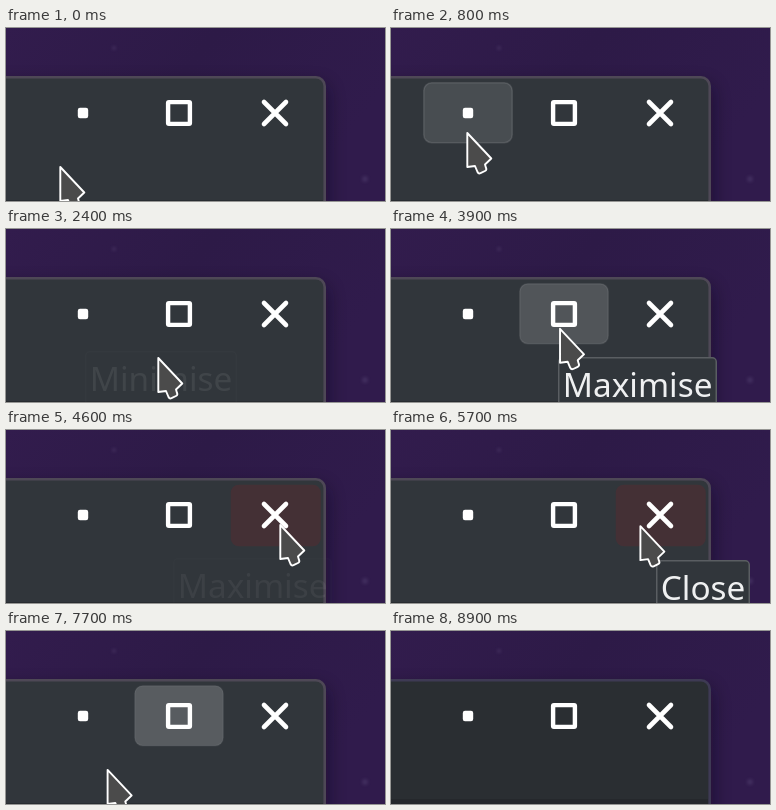
An HTML page for the animation above (9 s loop, 379x173 px).

```html
<!DOCTYPE html>
<html lang="en">
<head>
<meta charset="utf-8">
<title>Window buttons</title>
<style>
html, body { margin: 0; width: 100%; height: 100%; overflow: hidden; background: #2c1a46; }
svg { display: block; width: 100vw; height: 100vh; }
text { font: 33.33px "Noto Sans", sans-serif; fill: #eff0f1; }
</style>
</head>
<body>
<svg viewBox="0 0 379 173" xmlns="http://www.w3.org/2000/svg">
  <defs>
    <linearGradient id="sky" x1="0" y1="0" x2="1" y2="0.35">
      <stop offset="0" stop-color="#321c4d"/>
      <stop offset="0.5" stop-color="#2d1a47"/>
      <stop offset="1" stop-color="#301b4c"/>
    </linearGradient>
    <filter id="soft" x="-20%" y="-50%" width="140%" height="200%"><feGaussianBlur stdDeviation="9"/></filter>
    <filter id="blur" x="-100%" y="-100%" width="300%" height="300%"><feGaussianBlur stdDeviation="1.5"/></filter>
  </defs>
  <rect width="379" height="173" fill="url(#sky)"/>
  <g fill="#5a4a78" opacity="0.4" filter="url(#blur)">
    <circle cx="108" cy="20" r="2"/>
    <circle cx="359" cy="151" r="3"/>
  </g>
  <rect x="-60" y="56" width="382" height="190" rx="10" fill="#0c0618" opacity="0.45" filter="url(#soft)"/>
  <rect id="frame" x="-20" y="48" width="340" height="200" rx="10"/>
  <rect id="body" x="-20" y="50.6" width="337.4" height="200" rx="7.5"/>
  <rect id="edge" x="0" width="317" height="10" fill="#282c30"/>
  <g id="buttons"></g>
  <rect x="71.8" y="79.8" width="10.4" height="10.4" rx="2.2" fill="#fff"/>
  <rect x="162.1" y="74.1" width="21.8" height="21.8" rx="0.8" fill="none" stroke="#fff" stroke-width="4.4"/>
  <path d="M258 74L280 96M280 74L258 96" stroke="#fff" stroke-width="4.6" stroke-linecap="round"/>
  <g id="tips"></g>
  <path id="cursor" d="M0.3 0V34L8 33L10.5 39Q11.5 41 13.5 40.2L18 38Q20 37 19 35L18 31.5L24.3 25.5Z" fill="#4b4b4b" stroke="#fff" stroke-width="1.9" stroke-linejoin="round"/>
</svg>
<script>
const LOOP = 9000, STEP = 100;
const $ = id => document.getElementById(id);
const set = (el, attrs) => { for (const k in attrs) el.setAttribute(k, attrs[k]); };

function add(parent, tag, attrs) {
  const el = document.createElementNS("http://www.w3.org/2000/svg", tag);
  set(el, attrs);
  parent.appendChild(el);
  return el;
}

const ramp = (t, from, to) => Math.min(1, Math.max(0, (t - from) / (to - from)));
const smooth = u => u * u * (3 - 2 * u);

// Fades in from a to b and out from c to d
const pulse = (t, [a, b, c, d]) => ramp(t, a, b) - ramp(t, c, d);

const begin = [54, 139];
// Each move: leave, arrive, x, y
const moves = [
  [100, 800, 76, 105], [1700, 2400, 152, 129], [2700, 2800, 164, 100],
  [3800, 4600, 274, 95], [4900, 5000, 282, 93], [5400, 6200, 178, 103],
  [7000, 7400, 111, 136], [7600, 8200, -20, 176]
];

function cursorAt(t) {
  return moves.reduce(([x, y], [leave, arrive, toX, toY]) => {
    const u = smooth(ramp(t, leave, arrive));
    return [x + (toX - x) * u, y + (toY - y) * u];
  }, begin);
}

const white = { color: "#fff", fill: 0.19, line: 0.2, peak: 1, grow: 0 };
const red = { color: "#9c1a1c", fill: 0.36, line: 0, peak: 1, grow: 1.5 };
const buttons = [
  { ...white, peak: 0.6, fades: [[400, 800, 1700, 2300]] },
  { ...white, fades: [[2700, 2800, 3800, 4300], [6100, 6400, 7700, 8200]] },
  { ...red, fades: [[4500, 4700, 5400, 6000]] }
];

const tips = [
  { text: "Minimise", x: 79, y: 122, w: 152, fade: [1100, 1400, 1800, 2450] },
  { text: "Maximise", x: 167, y: 128, w: 159, fade: [2700, 2800, 4100, 4630] },
  { text: "Close", x: 265, y: 130, w: 94, fade: [4600, 4700, 5700, 6370] },
  { text: "Maximise", x: 185, y: 125, w: 159, fade: [6800, 7100, 7100, 7400] }
];

buttons.forEach((b, i) => {
  b.el = add($("buttons"), "rect", {
    x: 32.75 + 96 * i, y: 54.75, width: 88.5 + b.grow, height: 60 + b.grow, rx: 8,
    fill: b.color, stroke: b.color, "stroke-width": 1.6
  });
});

for (const p of tips) {
  p.el = add($("tips"), "g", {});
  add(p.el, "rect", {
    x: p.x + 0.75, y: p.y + 0.75, width: p.w - 1.5, height: 54, rx: 4,
    fill: "#31363b", stroke: "#5a5e62", "stroke-width": 1.5
  });
  add(p.el, "text", { x: p.x + 4.8, y: p.y + 40.4 }).textContent = p.text;
}

function draw(t) {
  const idle = ramp(t, 8700, 8900);
  const mix = (a, b) => "rgb(" + a.map((v, i) => Math.round(v + (b[i] - v) * idle)) + ")";
  set($("frame"), { fill: mix([78, 72, 86], [62, 58, 84]) });
  set($("body"), { fill: mix([49, 54, 59], [42, 46, 50]) });
  set($("edge"), { y: 172 - 4 * idle, fill: mix([40, 44, 48], [37, 40, 44]) });

  // The fades hang for a moment before the next hover
  const clock = t > 2400 && t < 2800 ? 2400 : t;
  for (const b of buttons) {
    const h = b.peak * b.fades.reduce((sum, f) => sum + pulse(clock, f), 0);
    set(b.el, {
      "fill-opacity": b.fill * h,
      "stroke-opacity": b.line * Math.min(1, 2.2 * h) * (1 - 0.75 * h)
    });
  }
  for (const p of tips) set(p.el, { opacity: pulse(clock, p.fade) });

  const [x, y] = cursorAt(t);
  set($("cursor"), {
    transform: `translate(${x} ${y})`,
    visibility: t < 8200 ? "visible" : "hidden"
  });
}

const start = performance.now();
function tick() {
  const t = (performance.now() - start) % LOOP;
  draw(Math.floor(t / STEP) * STEP);
  requestAnimationFrame(tick);
}
tick();
</script>
</body>
</html>
```
